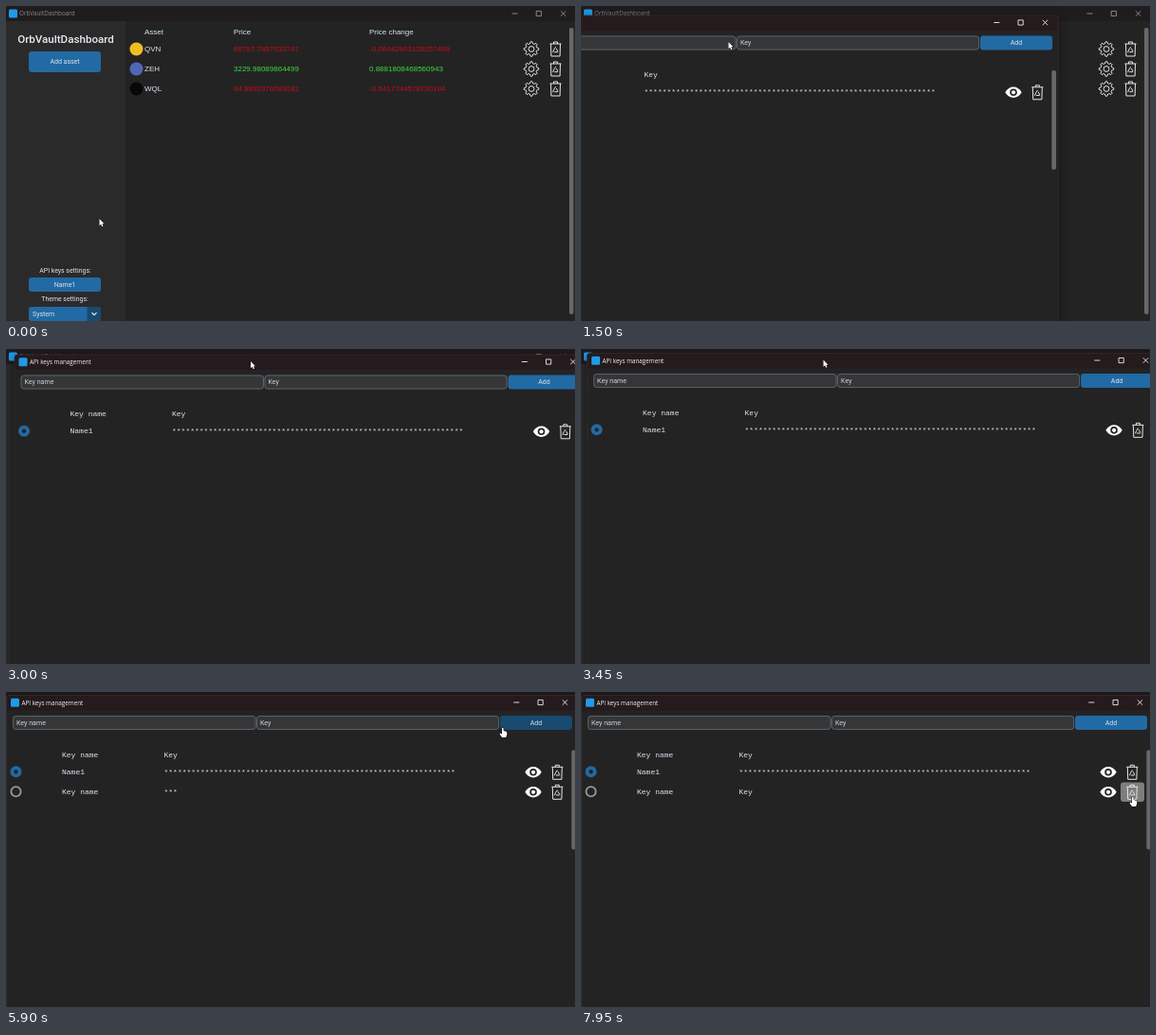
An HTML page with a canvas that plays this animation: 600 px wide and 333 px high, repeating every 8 s.

```html
<!DOCTYPE html>
<html lang="en">
<head>
<meta charset="utf-8">
<title>Key manager</title>
<style>
  html, body { margin: 0; width: 100%; height: 100%; overflow: hidden; background: #242324; }
  canvas { display: block; width: 100vw; height: 100vh; }
</style>
</head>
<body>
<canvas id="stage" width="600" height="333"></canvas>
<script>
const ctx = document.getElementById('stage').getContext('2d');
const LOOP = 8000, STEP = 50;
const UI = 'Roboto, sans-serif', CAPTION = '"Open Sans", sans-serif';
const ARIAL = '"Liberation Sans", Arial, sans-serif', MONO = '"Liberation Mono", monospace';
const BLUE = '#226aa4', DARK_BLUE = '#194a70', BODY = '#242324', TEXT = '#dce4ee';
const RED = '#c80a18', GREEN = '#38e038';

const OPEN_AT = 1050, DRAG_FROM = 1750, DRAG_TO = 3900;
const ROW_AT = 5500, REVEAL_AT = 6700;
const GRAB = [249.5, 10.5];

// Keys are [time, x, y].
const windowPath = [[1750, -100, 6.5], [2450, -26.5, 7.5], [3000, 8.5, 2.5], [3500, 6, 1], [3900, 0, 0]];
const pointerPath = [
  [0, 98.5, 225], [550, 66, 293], [950, 66, 293], [1500, 155.5, 38], [1700, 149.5, 17],
  [3900, 249.5, 10.5], [4250, 263, 20], [4650, 390, 95], [5100, 508, 52], [5250, 540, 34],
  [5550, 540, 34], [5900, 524, 38], [5950, 526, 46], [6400, 553, 112], [6800, 556, 112],
  [7300, 570, 119], [7650, 580, 119], [7950, 582, 111]
];
const assets = [
  ['QVN', '#f0bd22', '66797.7857033747', '-0.06442963120257469', RED],
  ['ZEH', '#5068b4', '3229.98089864499', '0.8881808468560943', GREEN],
  ['WQL', '#080808', '84.9862976589182', '-0.6417744578730194', RED]
];

function follow(keys, t) {
  if (t <= keys[0][0]) return keys[0].slice(1);
  const i = keys.findIndex(key => key[0] > t);
  if (i < 0) return keys[keys.length - 1].slice(1);
  const [t0, x0, y0] = keys[i - 1], [t1, x1, y1] = keys[i];
  const p = (t - t0) / (t1 - t0), e = p * p * (3 - 2 * p);
  return [x0 + (x1 - x0) * e, y0 + (y1 - y0) * e];
}

const inside = ([px, py], [x, y, w, h]) => px >= x && px <= x + w && py >= y && py <= y + h;

function text(s, x, y, size, family, color = TEXT, align = 'left', weight = 400) {
  ctx.font = `${weight} ${size}px ${family}`;
  ctx.fillStyle = color;
  ctx.textAlign = align;
  ctx.fillText(s, x, y + size * 0.35);
}

function rect(x, y, w, h, color, radius = 0) {
  ctx.fillStyle = color;
  ctx.beginPath();
  ctx.roundRect(x, y, w, h, radius);
  ctx.fill();
}

function disc(x, y, r, color) {
  ctx.fillStyle = color;
  ctx.beginPath();
  ctx.arc(x, y, r, 0, 7);
  ctx.fill();
}

function stroke(color, width, path) {
  ctx.strokeStyle = color;
  ctx.lineWidth = width;
  ctx.beginPath();
  path(ctx);
  ctx.stroke();
}

function at(x, y, draw) {
  ctx.save();
  ctx.translate(x, y);
  draw();
  ctx.restore();
}

function button([x, y, w, h], label, hovered) {
  rect(x, y, w, h, hovered ? DARK_BLUE : BLUE, 3);
  text(label, x + w / 2, y + h / 2, 7, UI, TEXT, 'center');
}

function entry(x, y, w, label) {
  rect(x, y, w, 15, '#343638', 3);
  stroke('#5d6265', 1, c => c.roundRect(x + 0.5, y + 0.5, w - 1, 14, 3));
  text(label, x + 4, y + 7.2, 7.1, UI, '#cfd3d6');
}

function caption(x, y, color) {
  stroke(color, 0.9, c => {
    c.moveTo(x - 3, y); c.lineTo(x + 3, y);
    c.rect(x + 22.7, y - 2.6, 5.2, 5.2);
    c.moveTo(x + 48.4, y - 2.7); c.lineTo(x + 53.8, y + 2.7);
    c.moveTo(x + 53.8, y - 2.7); c.lineTo(x + 48.4, y + 2.7);
  });
}

function gear(x, y) {
  at(x, y, () => {
    ctx.lineJoin = 'round';
    stroke('#e6e6e6', 1, c => {
      for (let i = 0; i < 32; i++) {
        const a = (i - 0.5) * Math.PI / 16, r = i % 4 < 2 ? 7.8 : 5.8;
        c.lineTo(r * Math.cos(a), r * Math.sin(a));
      }
      c.closePath();
      c.moveTo(2.9, 0);
      c.arc(0, 0, 2.9, 0, 7);
    });
  });
}

function bin(x, y) {
  at(x, y, () => {
    stroke('#e6e6e6', 1, c => {
      c.moveTo(-6, -5.5); c.lineTo(6, -5.5);
      c.moveTo(-2, -5.5); c.lineTo(-2, -7.5); c.lineTo(2, -7.5); c.lineTo(2, -5.5);
      c.moveTo(-5, -5.5); c.lineTo(-4.6, 7.5); c.lineTo(4.6, 7.5); c.lineTo(5, -5.5);
    });
    ctx.setLineDash([3.6, 1]);
    stroke('#e6e6e6', 1, c => {
      c.moveTo(-1.6, 0.4); c.lineTo(0, -2); c.lineTo(2.8, 3.2); c.lineTo(-2.8, 3.2); c.closePath();
    });
  });
}

function eye(x, y) {
  at(x, y, () => {
    ctx.fillStyle = '#fff';
    ctx.beginPath();
    ctx.moveTo(-8.7, 0);
    ctx.bezierCurveTo(-4.5, -7.6, 4.5, -7.6, 8.7, 0);
    ctx.bezierCurveTo(4.5, 7.6, -4.5, 7.6, -8.7, 0);
    ctx.fill();
    disc(0, 0, 3.8, BODY);
    disc(0, 0, 2.1, '#fff');
  });
}

function radio(x, y, checked) {
  const width = checked ? 3.8 : 1.8;
  stroke(checked ? BLUE : '#949a9f', width, c => c.arc(x, y, 6 - width / 2, 0, 7));
}

const keyButton = [24, 287, 76, 15], addButton = [521, 25, 76, 15], binButton = [569, 95.5, 25, 20.5];

function mainWindow(hoverKey) {
  rect(0, 0, 600, 333, BODY);
  rect(0, 16, 126, 317, '#2b2a2b');
  rect(0, 0, 600, 16, '#201c1e');
  rect(3, 3.5, 9, 9, '#1e9bea', 1.5);
  text('OrbVaultDashboard', 14, 8, 6.3, CAPTION, '#8c8a8b');
  caption(536.5, 8, '#969495');

  text('OrbVaultDashboard', 63, 34.5, 11.6, UI, '#e8ecf2', 'center', 500);
  button([24, 48, 76, 22], 'Add asset', false);
  text('API keys settings:', 62.5, 279.5, 6.9, UI, TEXT, 'center');
  button(keyButton, 'Name1', hoverKey);
  text('Theme settings:', 62, 310, 6.9, UI, TEXT, 'center');
  rect(24, 318, 76, 15, BLUE, 3);
  rect(85.5, 318, 14.5, 15, DARK_BLUE, [0, 3, 3, 0]);
  text('System', 28, 325.3, 7, UI);
  stroke(TEXT, 1.2, c => { c.moveTo(90.5, 324.3); c.lineTo(93, 326.7); c.lineTo(95.5, 324.3); });

  text('Asset', 146, 27.5, 8, ARIAL);
  text('Price', 240, 27.5, 8, ARIAL);
  text('Price change', 383, 27.5, 8, ARIAL);
  assets.forEach(([name, color, price, change, tone], i) => {
    const y = 45.5 + 21 * i;
    disc(137.5, y, 7, color);
    text(name, 146, y, 8, ARIAL);
    text(price, 240, y, 8, ARIAL, tone);
    text(change, 383, y, 8, ARIAL, tone);
    gear(554, y);
    bin(579.5, y);
  });
  rect(594, 23, 4.5, 303, '#686768', 2);
}

function keyRow(y, name, key, checked) {
  radio(10.5, y + 0.3, checked);
  text(name, 59, y, 8, MONO);
  text(key, 166.5, y, 8, MONO);
  eye(556, y + 0.8);
  bin(581.3, y + 0.8);
}

function keyWindow(t, pointer) {
  ctx.save();
  ctx.shadowColor = 'rgba(0,0,0,.55)';
  ctx.shadowBlur = 10;
  ctx.shadowOffsetY = 2;
  rect(0.5, 3.5, 603, 400, BODY, 3);
  ctx.restore();
  rect(0.5, 3.5, 603, 16, '#251a1c', [3, 3, 0, 0]);
  stroke('#383235', 0.6, c => c.roundRect(0.5, 3.5, 603, 400, 3));
  rect(5, 6.8, 9, 9, '#1e9bea', 1.5);
  text('API keys management', 16.5, 11.3, 6.3, CAPTION, '#f4f2f3');
  caption(538.3, 11, '#f0eeee');

  entry(7, 25, 256.5, 'Key name');
  entry(264, 25, 256, 'Key');
  button(addButton, 'Add', inside(pointer, addButton));
  text('Key name', 59, 66, 8, MONO);
  text('Key', 166.5, 66, 8, MONO);
  keyRow(84, 'Name1', '*'.repeat(64), true);
  if (t >= ROW_AT) {
    if (inside(pointer, binButton)) rect(...binButton, '#7f7e7f', 3);
    keyRow(105, 'Key name', t < REVEAL_AT ? '***' : 'Key', false);
  }
  rect(596.3, 61.5, 4.7, 105, '#686768', 2);
}

function arrow() {
  ctx.beginPath();
  [[0, 0], [0, 7.2], [1.7, 5.8], [2.8, 8.3], [4, 7.8], [2.9, 5.3], [5, 5.2]]
    .forEach(p => ctx.lineTo(...p));
  ctx.closePath();
}

function hand() {
  ctx.beginPath();
  [[-1, 0], [0.5, 0], [0.7, 3], [4, 4], [4.3, 6.5], [3.2, 10], [-1, 10], [-3.4, 6.4], [-2.8, 5.6], [-1, 6.6]]
    .forEach(p => ctx.lineTo(...p));
  ctx.closePath();
}

function drawPointer([x, y], overButton) {
  at(x, y, () => {
    (overButton ? hand : arrow)();
    ctx.lineJoin = 'round';
    ctx.strokeStyle = '#111';
    ctx.lineWidth = 1;
    ctx.stroke();
    ctx.fillStyle = '#fff';
    ctx.fill();
  });
}

function render(t) {
  const open = t >= OPEN_AT, offset = follow(windowPath, t);
  const dragging = t >= DRAG_FROM && t <= DRAG_TO;
  const pointer = dragging ? offset.map((v, i) => v + GRAB[i]) : follow(pointerPath, t);
  const local = pointer.map((v, i) => v - offset[i]);
  const overKey = !open && inside(pointer, keyButton);
  const eyeButton = [543.5, 95.5, 25, 20.5];
  const overButton = overKey || open && (inside(local, addButton) ||
    t >= ROW_AT && (inside(local, eyeButton) || inside(local, binButton)));

  mainWindow(overKey);
  if (open) at(...offset, () => keyWindow(t, local));
  drawPointer(pointer, overButton);
}

const start = performance.now();
function tick() {
  const t = (performance.now() - start) % LOOP;
  render(Math.floor(t / STEP) * STEP);
  requestAnimationFrame(tick);
}
tick();
</script>
</body>
</html>
```
